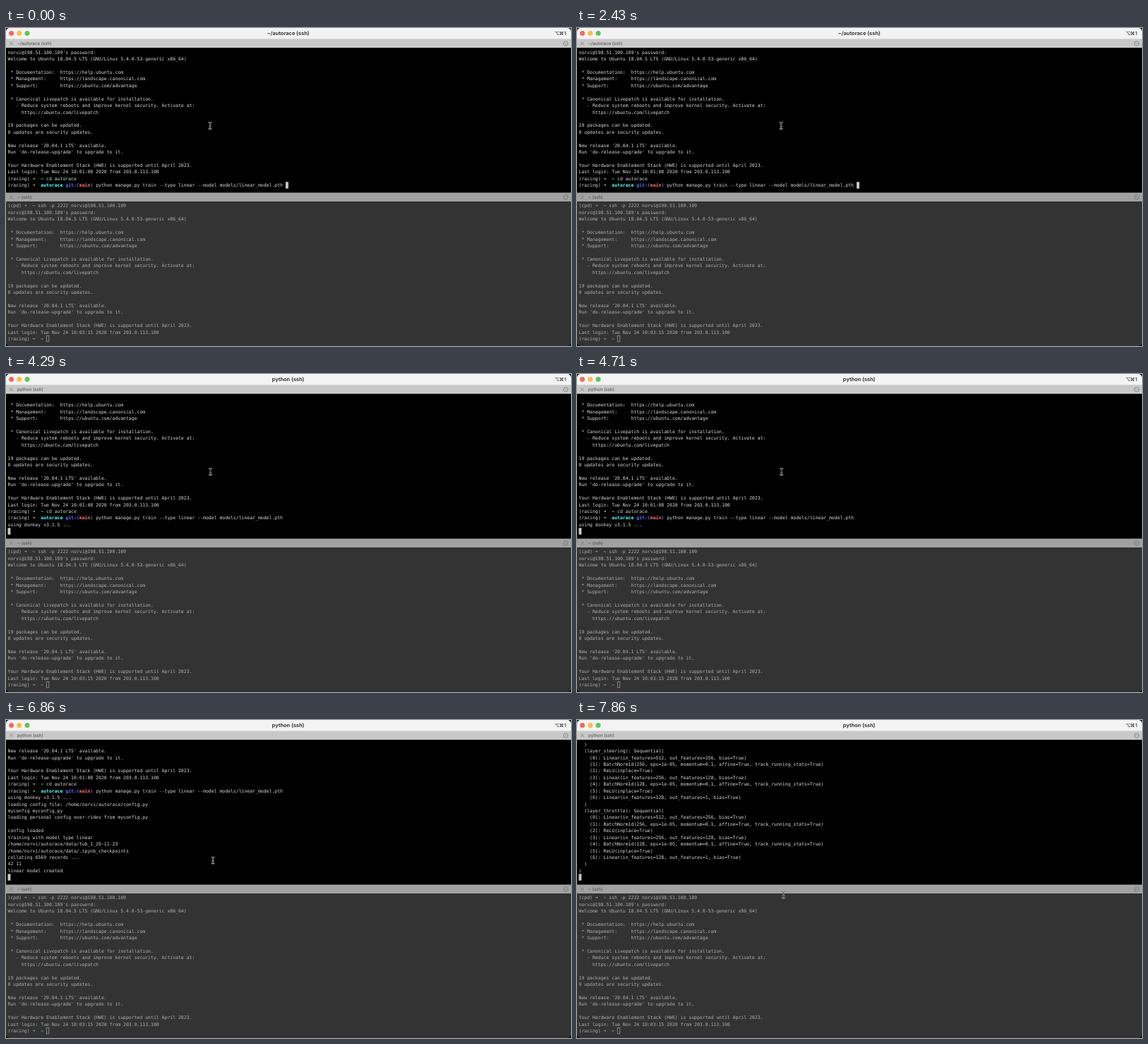
An HTML page for the animation above (8 s loop, 800 by 451 pixels).

```html
<!DOCTYPE html>
<html lang="en">
<head>
<meta charset="utf-8">
<title>Terminal session</title>
<style>
  html, body { margin: 0; width: 100%; height: 100%; overflow: hidden; background: #000; }
  svg { display: block; width: 800px; height: 451px; border-radius: 5px; }
  text { white-space: pre; text-rendering: geometricPrecision; }
  .ui { font-family: Inter, "Open Sans", sans-serif; font-size: 6.2px; fill: #454545; }
  .title { font-size: 7.4px; font-weight: 700; fill: #3a3a3a; }
  .keys { font-family: Inter, "DejaVu Sans", sans-serif; font-size: 6.8px; font-weight: 600; fill: #3a3a3a; }
  .term { font-family: "DejaVu Sans Mono", "Liberation Mono", monospace; font-size: 6.47px; fill: #dadada; }
  .green { fill: #9cf0a2; }
  .cyan { fill: #60fdff; }
  .blue { fill: #6871ff; }
  .red { fill: #ff6e67; }
  .cyan, .blue, .red { font-weight: 700; }
  .dim { fill: #b0b0b0; }
  .dim .green { fill: #88b88c; }
  .dim .cyan { fill: #78b9ba; }
  .icon { fill: none; stroke: #6d6d6d; stroke-width: .7; }
</style>
</head>
<body>
<svg viewBox="0 0 800 451">
  <rect width="800" height="16" fill="#f3f3f3"/>
  <circle cx="7.6" cy="7.6" r="3.5" fill="#ee6a5f"/>
  <circle cx="18.8" cy="7.6" r="3.5" fill="#f5bd4f"/>
  <circle cx="30" cy="7.6" r="3.5" fill="#61c454"/>
  <text id="title" class="ui title" x="399.5" y="10.1" text-anchor="middle"></text>
  <text class="keys" y="9.6"><tspan x="776.8">⌥</tspan><tspan x="783.3">⌘</tspan><tspan x="790.2">1</tspan></text>

  <rect y="15.5" width="800" height="12.5" fill="#c8c8c8"/>
  <text id="tab" class="ui" x="16" y="24.3"></text>
  <g id="top" class="term"></g>
  <rect id="block" width="3.9" height="9.4" fill="#c9c9c9"/>

  <rect y="233.5" width="800" height="12.5" fill="#a1a1a1"/>
  <text class="ui" x="16" y="242.2">~ (ssh)</text>
  <rect y="246" width="800" height="205" fill="#333"/>
  <g id="bottom" class="term dim"></g>
  <rect x="57.3" y="436.3" width="3.5" height="8.6" fill="none" stroke="#a4a4a4" stroke-width=".7"/>

  <g id="icons" class="icon"></g>
  <g id="mouse" fill="none" stroke-linecap="round"></g>
</svg>
<script>
const LOOP = 8000, STEPS = 56;
const LEFT = 2.5, COL = 3.895, ROW = 9.43, LAST = 20;
const TOP = 29.7, BOTTOM = 247.4, BASE = 7;
const USER = 'norvi', HOST = USER + '@198.51.100.109';
const $ = id => document.getElementById(id);

function add(parent, tag, attrs, text) {
  const el = document.createElementNS('http://www.w3.org/2000/svg', tag);
  for (const k in attrs) el.setAttribute(k, attrs[k]);
  if (text) el.textContent = text;
  parent.append(el);
  return el;
}

// A line is a string or a list of [text, class] parts on the character grid.
function drawLines(group, lines, top) {
  group.replaceChildren();
  lines.forEach((line, i) => {
    if (!line) return;
    const el = add(group, 'text', { y: top + BASE + i * ROW });
    let col = 0;
    for (const [text, cls] of Array.isArray(line) ? line : [[line, '']]) {
      add(el, 'tspan', { x: LEFT + col * COL, class: cls }, text);
      col += text.length;
    }
  });
}

const prompt = (env, ...rest) => [[`(${env}) `, ''], ['➜', 'green'], ['  ', ''], ...rest];

const greeting = login => [
  HOST + "'s password:",
  'Welcome to Ubuntu 18.04.5 LTS (GNU/Linux 5.4.0-53-generic x86_64)',
  '',
  ' * Documentation:  https://help.ubuntu.com',
  ' * Management:     https://landscape.canonical.com',
  ' * Support:        https://ubuntu.com/advantage',
  '',
  ' * Canonical Livepatch is available for installation.',
  '   - Reduce system reboots and improve kernel security. Activate at:',
  '     https://ubuntu.com/livepatch',
  '',
  '19 packages can be updated.',
  '0 updates are security updates.',
  '',
  "New release '20.04.1 LTS' available.",
  "Run 'do-release-upgrade' to upgrade to it.",
  '',
  'Your Hardware Enablement Stack (HWE) is supported until April 2023.',
  `Last login: Tue Nov 24 ${login} 2020 from 203.0.113.100`
];

const linear = (i, a, b) => `    (${i}): Linear(in_features=${a}, out_features=${b}, bias=True)`;
const norm = (i, n) => `    (${i}): BatchNorm1d(${n}, eps=1e-05, momentum=0.1, affine=True, track_running_stats=True)`;
const relu = i => `    (${i}): ReLU(inplace=True)`;
const layer = name => [
  `  (layer_${name}): Sequential(`,
  linear(0, 512, 256), norm(1, 256), relu(2),
  linear(3, 256, 128), norm(4, 128), relu(5),
  linear(6, 128, 1),
  '  )'
];

const home = `/home/${USER}/autorace/`;
const log = [
  ...greeting('10:01:08'),
  prompt('racing', ['~', 'cyan'], [' cd autorace', '']),
  prompt('racing', ['autorace', 'cyan'], [' ', ''], ['git:(', 'blue'], ['main', 'red'], [')', 'blue'],
    [' python manage.py train --type linear --model models/linear_model.pth', '']),
  'using donkey v3.1.5 ...',
  `loading config file: ${home}config.py`,
  'myconfig myconfig.py',
  'loading personal config over-rides from myconfig.py',
  '',
  'config loaded',
  'training with model type linear',
  home + 'data/tub_1_20-11-23',
  home + 'data/.ipynb_checkpoints',
  'collating 6569 records ...',
  '42 11',
  'linear model created',
  '  )',
  ...layer('steering'),
  ...layer('throttle'),
  ')'
];

// step, lines printed, cursor column, tab, window title
const SHELL = '~/autorace (ssh)', PY = 'python (ssh)';
const stages = [
  [0, 21, 101, SHELL, SHELL],
  [24, 21, 101, PY, SHELL],
  [26, 21, 0, PY, PY],
  [29, 22, 0, PY, PY],
  [33, 27, 0, PY, PY],
  [36, 33, 0, PY, PY],
  [52, log.length, 0, PY, PY]
];

// step, x, y of the pointer
const path = [
  [0, 289, 138.5], [19, 289, 138.5], [20, 289.5, 138.5], [44, 289.5, 138.5],
  [47, 293, 199], [49, 293, 199], [52, 292.4, 248], [STEPS, 292.4, 248]
];

function pointer(step) {
  const i = path.findIndex((p, n) => step < path[n + 1][0]);
  const [s0, x0, y0] = path[i], [s1, x1, y1] = path[i + 1];
  const u = (step - s0) / (s1 - s0), e = u * u * (3 - 2 * u);
  return [x0 + (x1 - x0) * e, y0 + (y1 - y0) * e];
}

function show([, count, col, tab, title]) {
  const line = col ? count - 1 : count, first = line - LAST;
  drawLines($('top'), log.slice(first, count), TOP);
  $('block').setAttribute('x', LEFT + col * COL);
  $('block').setAttribute('y', TOP + LAST * ROW);
  $('tab').textContent = tab;
  $('title').textContent = title;
}

drawLines($('bottom'), [
  prompt('cpd', ['~', 'cyan'], [' ssh -p 2222 ' + HOST, '']),
  ...greeting('10:03:15'),
  prompt('racing', ['~', 'cyan'])
], BOTTOM);

for (const y of [22, 239.9]) {
  add($('icons'), 'path', { d: `M5.2 ${y - 2.3}l4.6 4.6m0 -4.6l-4.6 4.6` });
  add($('icons'), 'circle', { cx: 792.5, cy: y, r: 3.2 });
  add($('icons'), 'path', { d: `M790.5 ${y}h.9m.7 0h.9m.7 0h.9` });
}

const beam = 'M-1.9 -4.5Q0 -4.5 0 -3.4Q0 -4.5 1.9 -4.5M0 -3.4V3.4M-1.9 4.5Q0 4.5 0 3.4Q0 4.5 1.9 4.5M-1 1.2H1';
add($('mouse'), 'path', { d: beam, stroke: '#e0e0e0', 'stroke-width': 1.5 });
add($('mouse'), 'path', { d: beam, stroke: '#111', 'stroke-width': .7 });

let current;
function tick(now) {
  const step = Math.floor((now % LOOP) / LOOP * STEPS);
  const stage = stages.filter(s => s[0] <= step).pop();
  if (stage !== current) show(current = stage);
  $('mouse').setAttribute('transform', `translate(${pointer(step)})`);
  requestAnimationFrame(tick);
}
tick(performance.now());
</script>
</body>
</html>
```
